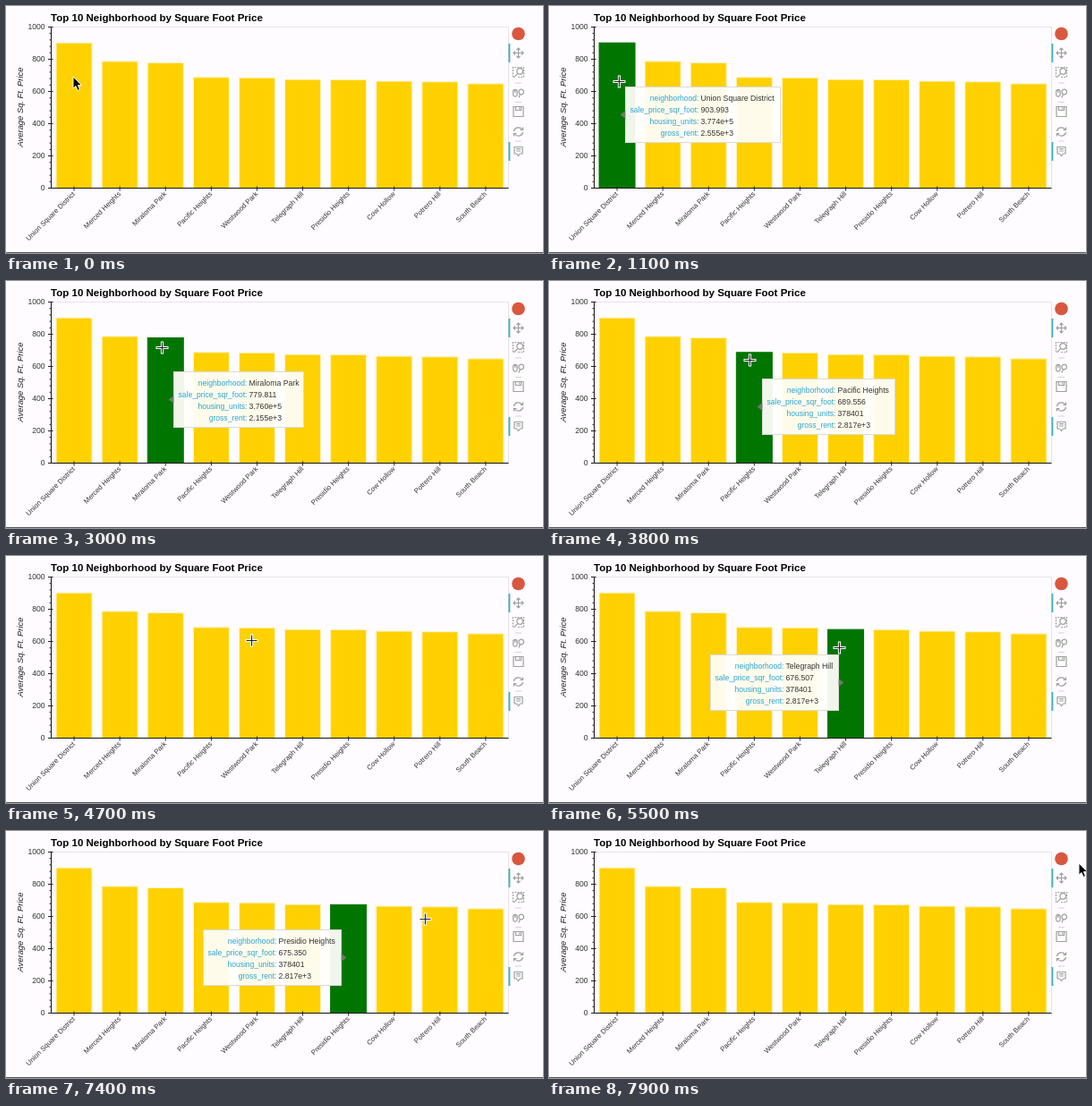
These frames come from a looping animation (600x276 px, 8000 ms). An HTML page:

```html
<!DOCTYPE html>
<html lang="en">
<head>
<meta charset="utf-8">
<title>Top 10 Neighborhood by Square Foot Price</title>
<style>
html, body { margin: 0; width: 100%; height: 100%; overflow: hidden; background: #fefcfe; }
svg { display: block; width: 100vw; height: 100vh; font-family: "Liberation Sans", Arial, sans-serif; }
.title { font-size: 11.54px; font-weight: bold; }
.ytitle { font-size: 9.4px; font-style: italic; fill: #222; }
.ytick { font-size: 8.6px; fill: #333; }
.xtick { font-size: 7.8px; fill: #333; }
.key { font-size: 8.55px; fill: #2ba3cf; }
.val { font-size: 8.7px; fill: #333; }
.end { text-anchor: end; }
.icon { fill: none; stroke: #a0a0a0; stroke-width: 1.2; }
</style>
</head>
<body>
<svg id="stage" viewBox="0 0 600 276" preserveAspectRatio="none"></svg>
<script>
const NS = "http://www.w3.org/2000/svg";
const stage = document.getElementById("stage");
const LEFT = 50.5, TOP = 23.5, BASE = 203.5, STEP = 51.1, LOOP = 8000;

function add(tag, attrs, parent = stage, text) {
  const el = document.createElementNS(NS, tag);
  for (const k in attrs) el.setAttribute(k, attrs[k]);
  if (text !== undefined) el.textContent = text;
  parent.appendChild(el);
  return el;
}
const path = (d, stroke, width = 1, parent = stage) =>
  add("path", { d, fill: "none", stroke, "stroke-width": width }, parent);
const label = (x, y, cls, text, extra = {}, parent = stage) =>
  add("text", { x, y, class: cls, ...extra }, parent, text);

// name, price, units, rent, tooltip width
const rows = [
  ["Union Square District", "903.993", "3.774e+5", "2.555e+3", 173],
  ["Merced Heights", "788.845", "380348", "3414", 152],
  ["Miraloma Park", "779.811", "3.760e+5", "2.155e+3", 145],
  ["Pacific Heights", "689.556", "378401", "2.817e+3", 148],
  ["Westwood Park", "687.088", "382295", "3959", 151],
  ["Telegraph Hill", "676.507", "378401", "2.817e+3", 143],
  ["Presidio Heights", "675.350", "378401", "2.817e+3", 154],
  ["Cow Hollow", "665.964"],
  ["Potrero Hill", "662.014"],
  ["South Beach", "650.124"]
];
const keys = ["neighborhood:", "sale_price_sqr_foot:", "housing_units:", "gross_rent:"];
const centre = i => LEFT + STEP * (i + .5);
const level = v => BASE - .18 * v;

// chart
label(50, 17, "title", "Top 10 Neighborhood by Square Foot Price");
add("rect", { x: LEFT, y: TOP, width: 511, height: 180, fill: "none", stroke: "#e6e4e6" });
const bars = rows.map(([name, price], i) => {
  const y = level(price);
  const bar = add("rect", { x: centre(i) - 20, y: y + .4, width: 40, height: BASE - y - .4 });
  label(0, 0, "xtick end", name, { transform: `translate(${centre(i) + 1.5} 210.6) rotate(-45)` });
  return bar;
});
path(`M${LEFT} ${TOP}V${BASE}H561.5`, "#111");
for (let v = 0; v <= 1000; v += 40) {
  const major = v % 200 === 0;
  path(`M${major ? 47 : 48.5} ${level(v)}H${major ? 52.5 : 50.5}`, "#222");
  if (major) label(43.5, level(v) + 2.5, "ytick end", v);
}
rows.forEach((_, i) => path(`M${centre(i)} 201.5V206.5`, "#222"));
label(0, 0, "ytitle", "Average Sq. Ft. Price", { transform: "translate(19.4 113) rotate(-90)", "text-anchor": "middle" });
path("M0 275.5H600", "#585858");

// toolbar
add("circle", { cx: 572.5, cy: 31, r: 7.3, fill: "#d9573f" });
const icon = (y, d) => add("path", { d, class: "icon", transform: `translate(572.5 ${y})` });
icon(52.5, "M-5.5 0H5.5M0-5.5V5.5M-3.5-2L-5.5 0L-3.5 2M3.5-2L5.5 0L3.5 2M-2-3.5L0-5.5L2-3.5M-2 3.5L0 5.5L2 3.5");
icon(74, "M-6 5.5V-5.5H6V5.5H-1").setAttribute("stroke-dasharray", "2 1.2");
icon(74, "M5-1A3.3 3.3 0 1 1-1.6-1A3.3 3.3 0 1 1 5-1M-.6 1.4L-5 5.8");
icon(97, "M-5.8-1.5A2.2 2.2 0 0 1-1.4-1.5V2A2.2 2.2 0 0 1-5.8 2ZM-3.6-3V0M6-1A2.8 2.8 0 1 1 .4-1A2.8 2.8 0 1 1 6-1M2 1.5L.4 5.5");
icon(118, "M-5.5-5.5H5.5V5.5H-5.5ZM-3-5.5V-1.5H3V-5.5M1-4.5V-2.5");
icon(140.5, "M-5-.7A5 4.6 0 0 1 4.2-2.5M5 .7A5 4.6 0 0 1-4.2 2.5M5-5V-2H2M-5 5V2H-2");
icon(162, "M-4.5-4.5H4.5V3H2L0 5.5L-2 3H-4.5ZM-2.5-2.3H2.5M-2.5 0H2.5");
for (const y of [86, 107.5, 151]) path(`M569 ${y}H576`, "#d4d4d4");
path("M562.4 42V63M562.4 152V173", "#45b0bf", 1.9);

// tooltips, placed towards the middle of the plot
const tips = rows.slice(0, 7).map(([name, price, units, rent, w], i) => {
  const g = add("g", { visibility: "hidden" });
  const right = i < 5, c = centre(i);
  const x = right ? Math.round(c + 9) + .5 : Math.round(c - 8.5 - w) + .5;
  const mid = Math.floor((level(price) + BASE) / 2) - .5;
  const edge = right ? x : x + w;
  const tip = right ? -6 : 6;
  add("rect", { x, y: mid - 31, width: w, height: 62, fill: "#fffefa", "fill-opacity": .94, stroke: "#dddbd8" }, g);
  add("path", { d: `M${edge} ${mid - 4.5}l${tip} 4.5l${-tip} 4.5z`, fill: "#808080", "fill-opacity": .8 }, g);
  [name, price, units, rent].forEach((value, k) => {
    const y = mid - 16 + 13 * k;
    label(x + 82, y, "key end", keys[k], {}, g);
    label(x + 84, y, "val", value, {}, g);
  });
  return g;
});

// pointers
const arrow = add("path", {
  d: "M0 0V13.2L3 10.5L5.1 15.4L7.5 14.4L5.4 9.6H9.6Z",
  fill: "#000", stroke: "#fff", "stroke-width": 1
});
const cross = add("g", {});
path("M-6.5 .5H7.5M.5-6.5V7.5", "#fff", 3.2, cross);
path("M-5.5 .5H6.5M.5-5.5V6.5", "#222", 1.2, cross);

// time, x, y
const route = [
  [0, 75, 79], [900, 75, 79], [1100, 78, 84], [1600, 82, 82], [1900, 122, 76],
  [2500, 126, 74], [2800, 164, 74], [3000, 174, 74], [3500, 177, 76],
  [3800, 224, 88], [4400, 232, 92], [4700, 274, 94], [5200, 282, 96],
  [5500, 324, 102], [6000, 346, 106], [6500, 376, 107], [7100, 392, 106],
  [7400, 468, 98], [7600, 532, 76], [7800, 584, 44], [7900, 592, 36]
];
// time, hovered bar
const hovers = [[0, -1], [1000, 0], [1800, 1], [2800, 2], [3700, 3], [4600, -1], [4800, 4], [5500, 5], [6500, 6], [7500, -1]];

function pointAt(t) {
  const n = route.findIndex(p => p[0] > t);
  if (n < 0) return route[route.length - 1].slice(1);
  const a = route[n - 1], b = route[n], f = (t - a[0]) / (b[0] - a[0]);
  return [a[1] + (b[1] - a[1]) * f, a[2] + (b[2] - a[2]) * f];
}

function draw(t) {
  const hot = hovers.filter(h => h[0] <= t).pop()[1];
  bars.forEach((bar, i) => {
    bar.setAttribute("fill", i === hot ? "#007500" : "#ffd100");
    bar.setAttribute("stroke", i === hot ? "#007500" : "#fff3c4");
  });
  tips.forEach((tip, i) => tip.setAttribute("visibility", i === hot ? "visible" : "hidden"));
  const [x, y] = pointAt(t);
  const plain = t < 1000 || x > 562;
  arrow.setAttribute("visibility", plain ? "visible" : "hidden");
  cross.setAttribute("visibility", plain ? "hidden" : "visible");
  (plain ? arrow : cross).setAttribute("transform", `translate(${x} ${y})`);
}

const start = performance.now();
function tick() {
  const t = (performance.now() - start) % LOOP;
  draw(Math.floor(t / 100) * 100);
  requestAnimationFrame(tick);
}
tick();
</script>
</body>
</html>
```
